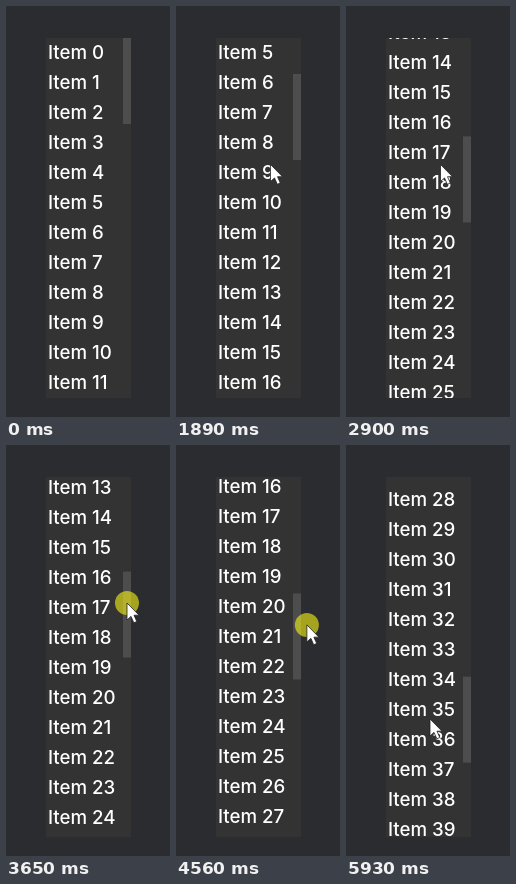
Recreate the animation shown at these times as an HTML page. Size 164 by 411 pixels, loop 6 s.

```html
<!DOCTYPE html>
<html lang="en">
<head>
<meta charset="utf-8">
<title>Scrolling list</title>
<style>
html, body { margin: 0; width: 100%; height: 100%; overflow: hidden; background: #2b2c2f; }
#list { position: absolute; left: 40px; top: 32px; width: 85px; height: 360px; overflow: hidden; background: #333; }
#items { color: #fff; font: 500 18.7px/30px Inter, sans-serif; white-space: pre; padding-left: 2px; }
#thumb { position: absolute; right: 0; top: 0; width: 8px; height: 86.4px; background: #4d4d4d; }
svg { position: absolute; left: 0; top: 0; overflow: visible; }
</style>
</head>
<body>
<div id="list"><div id="items"></div><div id="thumb"></div></div>
<svg id="pointer" width="1" height="1">
  <circle id="press" r="12" fill="#fffa14" fill-opacity=".58"/>
  <path d="M0 0V17L4 13.4L6.8 19.8L9.8 18.5L7 12.2H12Z" fill="#fff" stroke="#222" stroke-width=".8"/>
</svg>
<script>
const $ = id => document.getElementById(id);
const LOOP = 6000, TICK = 70, RATIO = 360 / 1500;
const GRAB = 3510, RELEASE = 4910;

$('items').innerHTML = Array.from({length: 50}, (_, i) => `<div>Item ${i}</div>`).join('');

// Each burst of activity updates on its own 70 ms beat.
const bursts = [0, 670, 1220, 1480, 1890, 2360, 2830, 3100, 3510, 5320, 5930];

// Wheel notches: [time, scroll offset]
const wheel = [
  [0, 0], [1220, 20], [1290, 60],
  [1480, 80], [1550, 110], [1620, 130],
  [1890, 150], [1960, 190], [2030, 210],
  [2360, 230], [2430, 280], [2500, 310],
  [2830, 360], [2900, 410],
  [4840, 664], [5320, 685], [5390, 706], [5460, 727], [5530, 748],
  [5660, 769], [5730, 790], [5800, 811], [5860, 832]
];

// Pointer path: [time, x, y]
const path = [
  [670, 132, 208], [1020, 94.5, 158.5],
  [3030, 94.5, 158.5], [3310, 121, 162],
  [3510, 121, 162], [3650, 121, 158],
  [4140, 127, 101], [4840, 133, 222.8],
  [4910, 130, 224], [5120, 98, 228],
  [5929, 98, 228], [5930, 84, 274]
];

const last = (rows, t) => rows.findLast(r => r[0] <= t);

function pointerAt(t) {
  const i = path.findLastIndex(p => p[0] <= t);
  const a = path[Math.max(i, 0)], b = path[i + 1] || a;
  const u = a === b ? 0 : Math.max(0, (t - a[0]) / (b[0] - a[0]));
  const e = u * u * (3 - 2 * u);
  return [a[1] + (b[1] - a[1]) * e, a[2] + (b[2] - a[2]) * e];
}

function draw(now) {
  const time = now % LOOP;
  const start = bursts.findLast(s => s <= time);
  const t = start + Math.floor((time - start) / TICK) * TICK;
  const [x, y] = pointerAt(t);
  const dragging = t >= GRAB && t < 4840;
  const scroll = dragging ? 394 + (y - 158) / RATIO : last(wheel, time)[1];

  $('items').style.transform = `translateY(${-Math.round(scroll)}px)`;
  $('thumb').style.transform = `translateY(${scroll * RATIO}px)`;
  $('pointer').style.transform = `translate(${x}px, ${y}px)`;
  $('pointer').style.visibility = time < 670 ? 'hidden' : 'visible';
  $('press').style.display = t >= GRAB && t < RELEASE ? '' : 'none';
  requestAnimationFrame(draw);
}
requestAnimationFrame(draw);
</script>
</body>
</html>
```
